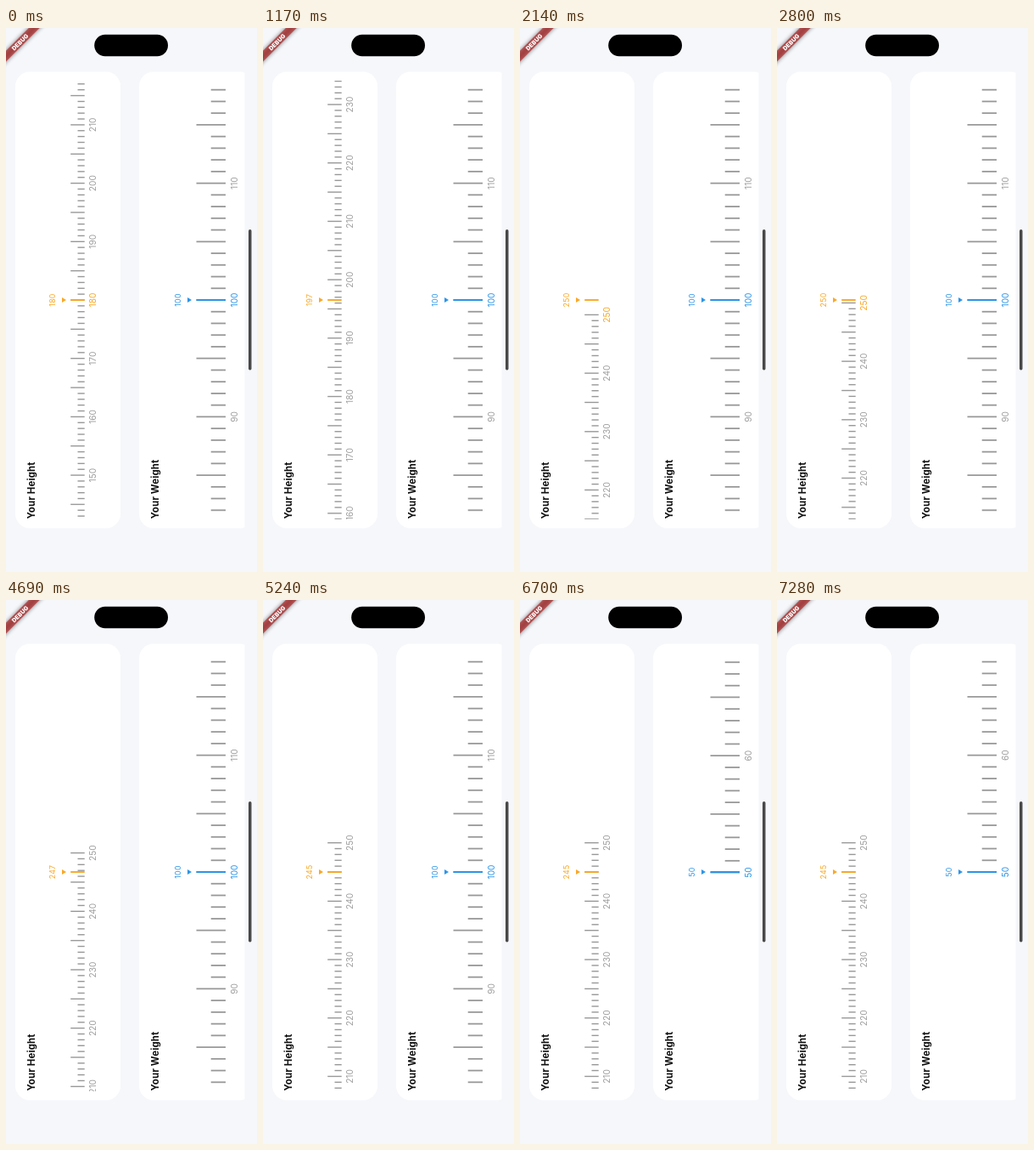
An HTML page that plays this animation: 296x640 px, repeating every 8000 ms.

```html
<!DOCTYPE html>
<html lang="en">
<head>
<meta charset="utf-8">
<title>Height and weight pickers</title>
<style>
  html, body { margin: 0; width: 100%; height: 100%; overflow: hidden; background: #f6f7fb; }
  svg { display: block; width: 100%; height: 100%; }
  text { font-family: Inter, Roboto, sans-serif; }
  .title { font-size: 11.3px; font-weight: 700; letter-spacing: .22px; fill: #111; }
  .label { font-size: 10.2px; text-anchor: middle; }
  .value { font-size: 8.8px; letter-spacing: .25px; text-anchor: middle; }
  .debug { font-size: 7px; font-weight: 900; text-anchor: middle; fill: #fff; }
</style>
</head>
<body>
<svg viewBox="0 0 296 640">
  <defs>
    <clipPath id="window"><rect y="62" width="282" height="516"/></clipPath>
    <clipPath id="page"><rect width="281.5" height="640"/></clipPath>
    <filter id="blur" x="-20%" y="-150%" width="140%" height="400%">
      <feGaussianBlur stdDeviation="2.8"/>
    </filter>
  </defs>
  <rect width="296" height="640" fill="#f6f7fb"/>
  <g fill="#fff" clip-path="url(#page)">
    <rect x="11" y="51.5" width="124" height="537" rx="17"/>
    <rect x="157" y="51.5" width="135" height="537" rx="17"/>
  </g>
  <g id="pickers"></g>
  <rect x="104.2" y="7.8" width="86.8" height="25.4" rx="12.7"/>
  <rect x="286" y="237" width="3.5" height="165.5" rx="1.75" fill="#484848"/>
  <g transform="rotate(-45)">
    <rect x="-40" y="19" width="80" height="9" opacity=".5" filter="url(#blur)"/>
    <rect x="-40" y="19" width="80" height="9" fill="#b71c1c" fill-opacity=".63"/>
    <text class="debug" y="26">DEBUG</text>
  </g>
</svg>
<script>
const LOOP = 8000, STEP = 109, MID = 320;
const TICK = '#989898', LABEL = '#9e9e9e';

const mix = (a, b, p) => a + (b - a) * p;
const drag = (m, ms) => mix(m.start, m.end, (ms / (m.to - m.from)) ** 1.15);
const glide = (m, ms) => mix(m.end, m.start, (1 - ms / (m.to - m.from)) ** 3);

// Critically damped spring that enters at fling speed and overshoots.
function spring(m, ms) {
  const stiff = 0.0045, speed = 0.12, gap = m.start - m.end;
  const slope = stiff * gap - Math.sign(gap) * speed;
  return m.end + (gap + slope * ms) * Math.exp(-stiff * ms);
}

const move = (ease, from, to, start, end) => ({ ease, from, to, start, end });

const heightMoves = [
  move(drag, 950, 1590, 180, 238.46),
  move(spring, 1590, 2800, 238.46, 250.5),
  move(glide, 3290, 3730, 250.5, 248),
  move(glide, 4580, 5240, 248, 245)
];
const weightMoves = [
  move(drag, 5830, 6260, 100, 66.2),
  move(spring, 6260, 7280, 66.2, 50)
];

// Each move advances in even, held steps.
function valueAt(moves, t) {
  const m = moves.filter(m => m.from <= t).pop();
  if (!m) return moves[0].start;
  if (t >= m.to) return m.end;
  const span = m.to - m.from;
  const step = span / Math.round(span / STEP);
  return m.ease(m, Math.floor((t - m.from) / step) * step);
}

function add(parent, tag, attrs, text = '') {
  const node = document.createElementNS('http://www.w3.org/2000/svg', tag);
  for (const name in attrs) node.setAttribute(name, attrs[name]);
  node.textContent = text;
  parent.appendChild(node);
  return node;
}

// Text running upwards, with its baseline at x.
function upText(parent, cls, x, y, text, fill) {
  const attrs = { class: cls, transform: `translate(${x} ${y}) rotate(-90)` };
  if (fill) attrs.fill = fill;
  return add(parent, 'text', attrs, text);
}

function makePicker(o) {
  const root = add(document.getElementById('pickers'), 'g', {});
  const view = add(root, 'g', { 'clip-path': 'url(#window)' });
  const scale = add(view, 'g', {});
  const labels = [];
  for (let n = o.min; n <= o.max; n++) {
    const y = -n * o.gap;
    add(scale, 'path', {
      d: `M${n % 5 ? o.short : o.long} ${y}H${o.right}`, stroke: TICK, 'stroke-width': o.line
    });
    if (n % 10 === 0) labels.push({ n, node: upText(scale, 'label', o.labelX, y, n) });
  }
  add(root, 'path', {
    d: `M${o.long} ${MID}H${o.right}`, stroke: o.color, 'stroke-width': 1.9
  });
  add(root, 'path', { d: `M${o.arrow} ${MID - 3}l5 3l-5 3z`, fill: o.color });
  upText(root, 'title', o.titleX, 577.5, o.title);
  const value = upText(root, 'value', o.valueX, MID, '', o.color);

  return t => {
    const v = valueAt(o.moves, t);
    const picked = Math.min(o.max, Math.max(o.min, Math.round(v)));
    scale.setAttribute('transform', `translate(0 ${MID + v * o.gap})`);
    value.textContent = picked;
    for (const { n, node } of labels) node.setAttribute('fill', n === picked ? o.color : LABEL);
  };
}

const pickers = [
  makePicker({
    title: 'Your Height', titleX: 34, color: '#f9a825', moves: heightMoves,
    min: 130, max: 250, gap: 6.87, line: 1.4,
    short: 84.5, long: 76.2, right: 92.7, labelX: 106.2, valueX: 57.8, arrow: 66
  }),
  makePicker({
    title: 'Your Weight', titleX: 180, color: '#2c95e8', moves: weightMoves,
    min: 50, max: 130, gap: 13.74, line: 1.8,
    short: 241.7, long: 224.5, right: 259, labelX: 272.6, valueX: 205.8, arrow: 214
  })
];

const begin = performance.now();
function frame() {
  const t = (performance.now() - begin) % LOOP;
  for (const show of pickers) show(t);
  requestAnimationFrame(frame);
}
frame();
</script>
</body>
</html>
```
